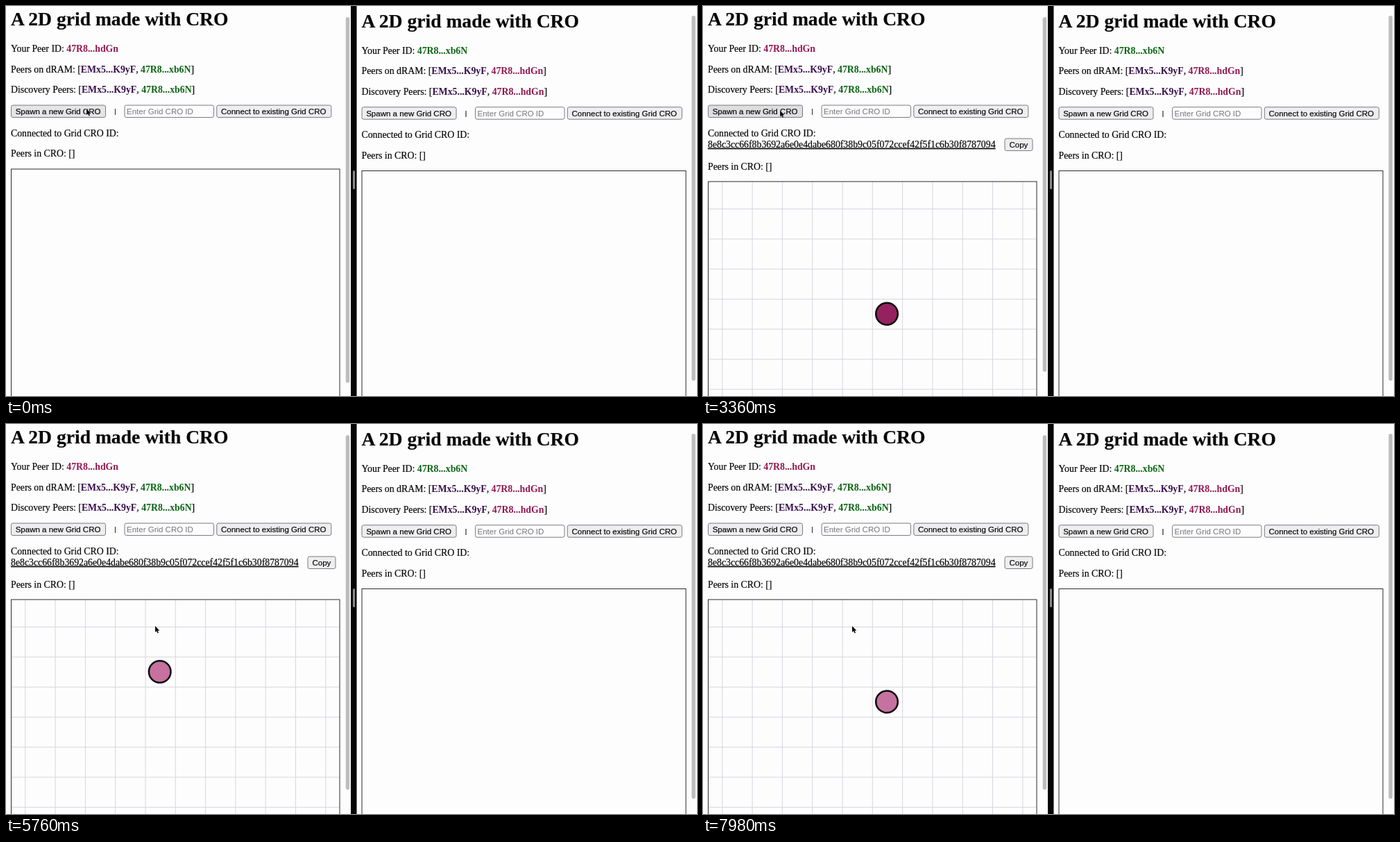
Animation, 996 px wide and 562 px high, one loop 8000 ms. Source, as an HTML page:

```html
<!DOCTYPE html>
<html lang="en">
<head>
<meta charset="utf-8">
<title>A 2D grid made with CRO</title>
<style>
html, body { margin: 0; width: 100%; height: 100%; overflow: hidden; background: #fdfdfd; }
svg { display: block; width: 100%; height: 100%; }
text {
  font: 13.8px "Liberation Serif", "Times New Roman", serif;
  fill: #080808; stroke: #080808; stroke-width: .2px;
}
.title { font-size: 27.6px; font-weight: bold; }
.id { font-weight: bold; stroke: none; }
.ui { font: 11.5px "Liberation Sans", Arial, sans-serif; }
.hint { fill: #757575; stroke: none; }
.bar { font-size: 11px; font-weight: bold; }
.hash { text-decoration: underline; }
.button { fill: #eee; stroke: #7b7884; }
.field { fill: #fdfdfd; stroke: #7b7884; }
.board { fill: none; stroke: #2b2b2b; }
.grid { fill: none; stroke: #d6d6df; }
.thumb { fill: #bdbdbd; }

.anim { animation: 8s linear infinite; }
.before { animation-name: before; animation-timing-function: step-end; }
.after { animation-name: after; animation-timing-function: step-end; }
.ghost { animation-name: ghost; animation-timing-function: step-end; opacity: 0; }
.left .spawn { animation: spawn 8s step-end infinite; }
#cursor { animation-name: cursor; animation-timing-function: ease-in-out; }

@keyframes before { 0% { visibility: visible } 20%, 100% { visibility: hidden } }
@keyframes after { 0% { visibility: hidden } 20%, 100% { visibility: visible } }
@keyframes ghost { 0% { opacity: 0 } 19% { opacity: .3 } 20%, 100% { opacity: 0 } }
@keyframes spawn {
  0% { fill: #e5e5e5 }
  16.5% { fill: #f2f2f2 }
  18% { fill: #e5e5e5 }
  20% { fill: #dedede }
  43.5%, 100% { fill: #eee }
}
@keyframes cursor {
  0%, 9% { transform: translate(116px, 148px) }
  17%, 20% { transform: translate(110px, 150px) }
  28%, 42% { transform: translate(111px, 150.5px) }
  47% { transform: translate(290px, 198px) }
  52.25% { transform: translate(232px, 244px) }
  56.25% { transform: translate(215px, 290px) }
  60%, 100% { transform: translate(215px, 291px) }
}
</style>
</head>
<body>
<svg viewBox="0 0 996 562" preserveAspectRatio="none">
  <g id="panes"></g>
  <rect x="497" width="8.5" height="562" fill="#050505"/>
  <rect x="500" y="237" width="3" height="27" rx="1.5" fill="#8a8a8a"/>
  <circle id="peer" class="anim after" r="15.8" stroke="#0a0a0a" stroke-width="2.5"/>
  <path id="cursor" class="anim" d="M0 0V9L2 7.2 3.5 10.4 5 9.7 3.6 6.7H6.3Z"
        fill="#050505" stroke="#fff" stroke-width=".8" paint-order="stroke"/>
</svg>
<script>
const LOOP = 8000, CELL = 43.3;
const self = { name: "47R8...hdGn", color: "#931650" };
const other = { name: "47R8...xb6N", color: "#0b6512" };
const relay = { name: "EMx5...K9yF", color: "#38104c" };

const id = p => `<tspan class="id" fill="${p.color}">${p.name}</tspan>`;
const text = (x, y, body, cls = "") => `<text x="${x}" y="${y}" class="${cls}">${body}</text>`;
const box = (x, y, w, cls) =>
  `<rect x="${x}" y="${y}" width="${w}" height="17.5" rx="2.5" class="${cls}"/>`;
const board = (y, w) => `<rect x="7.5" y="${y}" width="${w}" height="400" class="board"/>`;
const thumb = (x, y, h) =>
  `<rect x="${x}" y="${y}" width="5.5" height="${h}" rx="2.75" class="thumb"/>`;

function gridLines(top) {
  let d = "";
  for (let i = 0; i < 11; i++) d += `M${27.8 + i * CELL} ${top}V562`;
  for (let i = 0; i < 7; i++) d += `M8 ${292.5 + i * CELL}H481`;
  return d;
}

function pane(me, peer) {
  const peers = `[${id(relay)}, ${id(peer)}]`;
  return text(7, 28, "A 2D grid made with CRO", "title")
    + text(7, 66, `Your Peer ID: ${id(me)}`)
    + text(7, 95.5, `Peers on dRAM: ${peers}`)
    + text(7, 125, `Discovery Peers: ${peers}`)
    + box(7.5, 143, 136, "button spawn") + text(13.7, 156, "Spawn a new Grid CRO", "ui")
    + text(156.2, 155, "|", "bar")
    + box(171, 143, 128.5, "field") + text(174, 156, "Enter Grid CRO ID", "ui hint")
    + box(303.8, 143, 165, "button") + text(310, 156, "Connect to existing Grid CRO", "ui")
    + text(7, 187.5, "Connected to Grid CRO ID:");
}

const emptyPeers = y => text(7, y, "Peers in CRO: []");

document.getElementById("panes").innerHTML = `
  <g class="left">${pane(self, other)}
    <g class="anim before">${emptyPeers(217) + board(235, 473.5) + thumb(489.7, 16, 527)}</g>
    <path class="grid anim ghost" d="M244 496V562M287.3 466V562M374 379V562M417.2 325V562M460.5 292V562
      M190 552.3H481M244 509H481M275 465.7H481M325 422.4H481M365 379.1H481M448 292.5H481"/>
    <g class="anim after">
      ${text(7, 203.8, "8e8c3cc66f8b3692a6e0e4dabe680f38b9c05f072ccef42f5f1c6b30f8787094", "hash")}
      ${box(435, 191, 40, "button") + text(441.5, 204, "Copy", "ui")}
      <path class="grid" d="${gridLines(253)}"/>
      ${emptyPeers(235.5) + board(253, 473.5) + thumb(489.7, 16, 511)}
    </g>
  </g>
  <g transform="translate(505.5 2.7)">${pane(other, self) + emptyPeers(217) + board(234.8, 467)}</g>
  ${thumb(988.3, 14, 526)}`;

// Each step: time, column, row. A step restarts the glow.
const steps = [
  [1700, 0, 0], [5120, 0, -1], [5440, 0, -2], [5740, -1, -2], [5900, -2, -2],
  [6080, -2, -1], [7100, -2, 0], [7560, -1, 0], [7760, 0, 0], [7960, 0, -1]
];
const HALF_GLOW = 350;
const PALE = [199, 115, 160], DEEP = [143, 23, 87];
const peerDot = document.getElementById("peer");
const clock = peerDot.getAnimations()[0];

function ease(u) {
  const v = u ** 0.7;
  return v * v * (3 - 2 * v);
}

function glowColor(amount) {
  return `rgb(${PALE.map((pale, i) => pale + (DEEP[i] - pale) * amount)})`;
}

function draw() {
  const t = (clock.currentTime || 0) % LOOP;
  const [start, col, row] = steps.findLast(s => s[0] <= t) || steps[0];
  const phase = Math.max(0, t - start) / HALF_GLOW % 2;
  peerDot.setAttribute("cx", 265 + col * CELL);
  peerDot.setAttribute("cy", 443.6 + row * CELL);
  peerDot.setAttribute("fill", glowColor(ease(1 - Math.abs(1 - phase))));
  requestAnimationFrame(draw);
}
draw();
</script>
</body>
</html>
```
